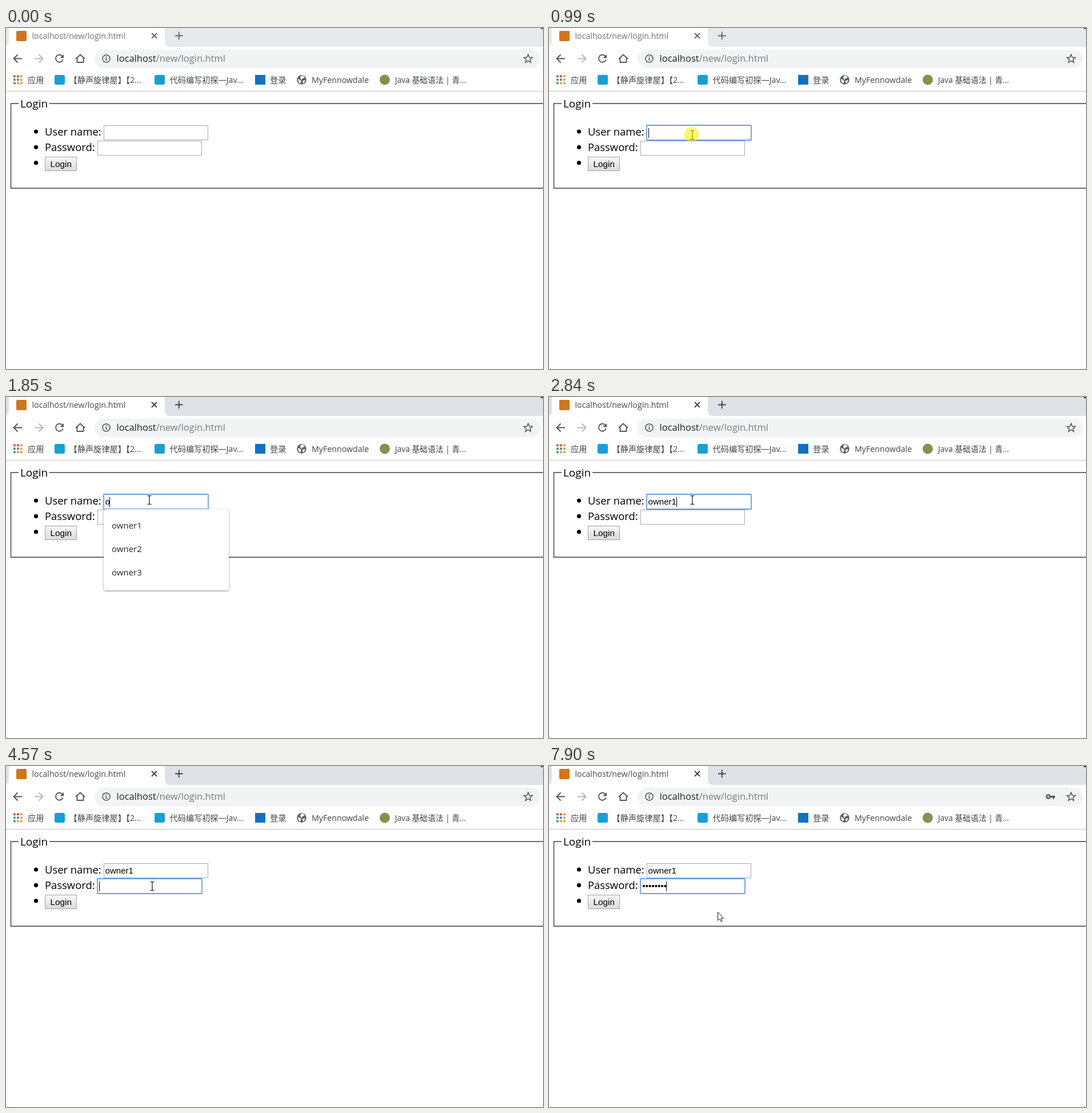
An HTML page that plays this animation: 940x596 px, repeating every 7990 ms.

```html
<!DOCTYPE html>
<html lang="zh">
<head>
<meta charset="utf-8">
<title>Login</title>
<style>
html, body { margin: 0; width: 100%; height: 100%; overflow: hidden; background: #fff; }
svg { display: block; width: 940px; height: 596px; }
text { white-space: pre; }
.ui { font-family: "Open Sans", "Noto Sans CJK SC", "Noto Sans CJK", sans-serif; }
.field { font: 15.1px "Liberation Sans", Arial, sans-serif; }
.mark { font-size: 14.2px; fill: #404347; }
.line { fill: none; stroke: #53575b; stroke-width: 1.9; }
.thin { stroke-width: 1.5; }
</style>
</head>
<body>
<svg viewBox="0 0 940 596">
  <rect width="940" height="596" fill="#fff"/>

  <g class="ui">
    <rect id="strip" width="940" height="33"/>
    <path d="M-4 33Q5 33 5 24V0H278V24Q278 33 287 33Z" fill="#fff"/>
    <rect x="18" y="5" width="18" height="18" rx="2" fill="#d0741f"/>
    <text id="title" x="45.5" y="19" font-size="14.2">localhost/new/login.html</text>
    <path id="signs" d="M255 9l9 9m0-9l-9 9M296 13.500h13.500m-6.750-6.750v13.500M936 1h4" fill="none" stroke-width="1.800"/>

    <path class="line" d="M28 53.500H14M20.500 46.500l-7 7 7 7"/>
    <path class="line" style="stroke:#b8babd" d="M50 53.500H64M57.500 46.500l7 7-7 7"/>
    <path class="line" d="M98.500 49A6.500 6.500 0 1 0 99.800 55"/>
    <path d="M101 46v6.500h-6.500z" fill="#53575b"/>
    <path class="line" d="M122 54l8-7.500 8 7.500M124.500 52.500V60h11V52.500"/>

    <rect x="155" y="38" width="780" height="32" rx="16" fill="#f1f3f4"/>
    <circle class="line thin" cx="175.500" cy="53.500" r="6.500"/>
    <path class="line" d="M175.500 52.500v4.500m0-7.500v1.700"/>
    <text x="193.500" y="59" font-size="16.5" fill="#202124">localhost<tspan fill="#787c81">/new/login.html</tspan></text>
    <path id="star" class="line thin"/>
    <g id="key" class="line">
      <circle cx="874" cy="53.500" r="3" stroke-width="2.600"/>
      <path d="M878 53.500h8M883 53.500v4" stroke-width="3"/>
    </g>

    <g id="apps"></g>
    <rect x="85" y="82" width="18" height="17" rx="3" fill="#169fd8"/>
    <rect x="260" y="82" width="18" height="17" rx="3" fill="#169fd8"/>
    <rect x="436" y="82" width="18" height="17" fill="#1270c4"/>
    <circle cx="517.500" cy="90.500" r="8.300" fill="#5a5d61"/>
    <path d="M511 89l3 1 3 3-2 4-3-3zM516 84l4-1 3 4-4 1-2 3-2-4zM519 92l5-1-3 6-2-2z" fill="#fff"/>
    <circle cx="663" cy="90.500" r="9" fill="#84924f"/>
    <g class="mark">
      <text x="38" y="95.500">应用</text>
      <text x="110.500" y="95.500">【静声旋律屋】【2...</text>
      <text x="286.500" y="95.500">代码编写初探—Jav...</text>
      <text x="462" y="95.500">登录</text>
      <text x="535" y="95.500">MyFennowdale</text>
      <text x="681" y="95.500" style="font-size:13.800px">Java 基础语法 | 青...</text>
    </g>
    <path d="M0 110.500H940" stroke="#bfc1c4"/>

    <path d="M22 132H8.500V280H945M76 132H945" fill="none" stroke="#6d6d6d" stroke-width="2"/>
    <g font-size="18.4">
      <text x="25" y="139" font-size="19">Login</text>
      <text x="68" y="187.500">User name:</text>
      <text x="68" y="215">Password:</text>
    </g>
    <circle cx="52.500" cy="181" r="3.600"/>
    <circle cx="52.500" cy="208.300" r="3.600"/>
    <circle cx="52.500" cy="235.700" r="3.600"/>
  </g>

  <g class="field">
    <rect id="userBox" fill="#fff"/>
    <rect id="passBox" fill="#fff"/>
    <linearGradient id="face" x2="0" y2="1">
      <stop stop-color="#f7f7f7"/><stop offset="1" stop-color="#dcdcdc"/>
    </linearGradient>
    <rect x="68.500" y="225.500" width="55" height="24" fill="url(#face)" stroke="#a3a3a3"/>
    <text x="77.500" y="242.500" font-size="15.300">Login</text>
    <text id="user" x="173.500" y="188"></text>
    <g id="dots"></g>
    <rect id="caret" width="1" height="17"/>
  </g>

  <g id="menu" class="ui" font-size="15" fill="#26282b">
    <rect id="menuBox" x="171" y="196" width="219" rx="4" fill="#fff" style="filter:drop-shadow(0 1px 1.500px #0007)"/>
    <g id="rows"></g>
  </g>

  <g id="pointer">
    <path id="beam" d="M-3.500-7.500h2.500l1 1 1-1H3.500M0-6.500V6.500M-3.500 7.500h2.500l1-1 1 1H3.500" fill="none" stroke="#111" stroke-width="1.200"/>
    <path id="arrow" d="M.5.500V15l3.300-3 2.200 5 2.300-1-2.200-4.800h4.600z" fill="#fff" stroke="#222"/>
    <circle id="click" cx="-1.500" cy="-1" r="13" fill="#f8f000" opacity=".56"/>
  </g>
</svg>

<script>
const LOOP = 7990;
const NAME = 'owner1';
const $ = id => document.getElementById(id);
const set = (el, attrs) => { for (const k in attrs) el.setAttribute(k, attrs[k]); return el; };
const add = (parent, tag, attrs) =>
  parent.appendChild(set(document.createElementNS('http://www.w3.org/2000/svg', tag), attrs));
const show = (el, on) => { el.style.display = on ? '' : 'none'; };
const within = (t, spans) => spans.some(([a, b]) => t >= a && t < b);
const passed = (t, times) => times.filter(at => t >= at).length;

// Static parts built by rule
const starPoints = Array.from({ length: 10 }, (_, i) => {
  const a = (i / 5 - 0.5) * Math.PI, r = i % 2 ? 3.4 : 7.8;
  return (914 + r * Math.cos(a)).toFixed(1) + ' ' + (54 + r * Math.sin(a)).toFixed(1);
});
set($('star'), { d: 'M' + starPoints.join('L') + 'Z' });

const appColors = ['#e0523f', '#e0523f', '#e8a13a', '#4a9c5d', '#4a7fd6', '#e8a13a', '#4a9c5d', '#e8a13a', '#e8a13a'];
appColors.forEach((fill, i) =>
  add($('apps'), 'rect', { x: 13 + i % 3 * 6, y: 82.5 + Math.floor(i / 3) * 6, width: 3.8, height: 3.8, fill }));

const rows = ['owner1', 'owner2', 'owner3', 'guest1', 'guest2', 'guest3'].map((name, i) => {
  const row = add($('rows'), 'text', { x: 185, y: 229.5 + 41 * i });
  row.textContent = name;
  return row;
});
const dots = Array.from({ length: 8 }, (_, i) =>
  add($('dots'), 'circle', { cx: 165.9 + 5.36 * i, cy: 209.8, r: 2.1 }));

// Timeline
const typed = [1850, 2000, 2200, 2400, 2620, 2840];
const secret = [5350, 5540, 5730, 6040, 6740, 7060, 7250, 7440];
const caretOn = [[990, 1540], [1850, 3390], [3940, 5030], [5350, 6590], [6740, LOOP]];
const clicks = [[990, 1080], [4490, 4570]];

// Pointer moves: start, number of 80 ms steps, then start, control and end points
const moves = [
  [210, 9, 960, 400, 420, 300, 251, 187],
  [1400, 1, 251, 187, 251, 184, 251, 180],
  [3540, 12, 251, 180, 172, 162, 256, 210],
  [4800, 2, 256, 210, 290, 210, 326, 202],
  [7900, 1, 326, 202, 310, 230, 295, 255]
];

function pointerAt(t) {
  const move = moves.filter(m => t >= m[0]).pop();
  if (!move) return null;
  const [start, steps, x0, y0, cx, cy, x1, y1] = move;
  const u = Math.min(1, (Math.floor((t - start) / 80) + 1) / steps);
  const bend = (a, b, c) => (1 - u) ** 2 * a + 2 * u * (1 - u) * b + u * u * c;
  return [bend(x0, cx, x1), bend(y0, cy, y1)];
}

const overField = (x, y) =>
  (x > 170 && x < 355 && y > 169 && y < 197) || (x > 159 && x < 344 && y >= 197 && y < 224);

// The focus ring sits half a pixel outside the plain border
function drawField(box, x, y, focused) {
  const out = focused ? 0.5 : 0;
  set(box, {
    x: x - out, y: y - out, width: 182 + 2 * out, height: 25 + 2 * out, rx: 2 * out,
    stroke: focused ? '#6d9ce3' : '#a9a9a9', 'stroke-width': focused ? 1.8 : 1
  });
}

function render(t) {
  const active = t >= 1080;
  const onUser = t >= 990 && t < 4490, onPass = t >= 4490;
  set($('strip'), { fill: active ? '#dee1e6' : '#e7eaed' });
  set($('title'), { fill: active ? '#45484c' : '#6f7378' });
  set($('signs'), { stroke: active ? '#3c4043' : '#5f6368' });

  drawField($('userBox'), 171.5, 170.5, onUser);
  drawField($('passBox'), 160.5, 197.5, onPass);

  const letters = passed(t, typed), count = passed(t, secret);
  $('user').textContent = NAME.slice(0, letters);
  dots.forEach((dot, i) => show(dot, i < count));
  show($('key'), count > 0);

  const caretX = onPass
    ? Math.max(163, Math.round(162 + 5.36 * count))
    : 174 + Math.floor(letters ? $('user').getComputedTextLength() - 0.5 : 0);
  set($('caret'), { x: caretX, y: onPass ? 202 : 175 });
  show($('caret'), within(t, caretOn));

  const size = letters ? 3 : 6;
  show($('menu'), t >= 1080 && t < 2840);
  set($('menuBox'), { height: 19 + 41 * size });
  rows.forEach((row, i) => show(row, i < size));

  const at = pointerAt(t);
  show($('pointer'), at);
  show($('click'), within(t, clicks));
  if (!at) return;
  const [x, y] = at;
  set($('pointer'), { transform: `translate(${x} ${y})` });
  show($('beam'), overField(x, y));
  show($('arrow'), !overField(x, y));
}

const begin = performance.now();
function tick() {
  render((performance.now() - begin) % LOOP);
  requestAnimationFrame(tick);
}
tick();
</script>
</body>
</html>
```
